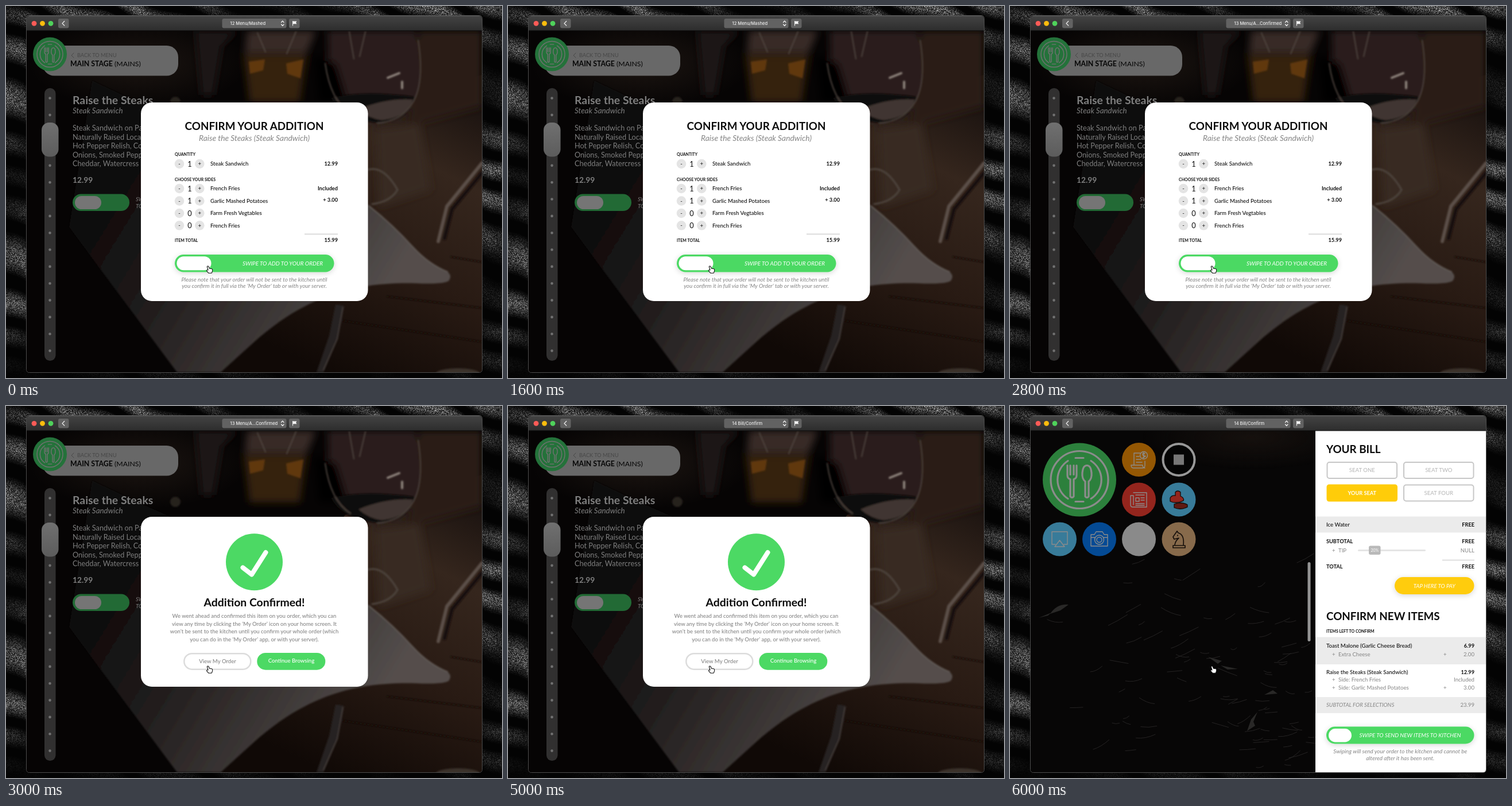
An HTML page with a canvas that plays this animation: 864x648 px, repeating every 6.2 s.

```html
<!DOCTYPE html>
<html lang="en">
<head>
<meta charset="utf-8">
<title>Restaurant ordering</title>
<style>
html, body { margin: 0; width: 100%; height: 100%; overflow: hidden; background: #000; }
canvas, svg { position: absolute; left: 0; top: 0; width: 864px; height: 648px; }
text { font: 9.6px Lato, "Open Sans", sans-serif; fill: #111; white-space: pre; }
.b { font-weight: 700; }
.m { font-weight: 500; }
.i { font-style: italic; }
.h { font-weight: 700; font-size: 18.8px; fill: #0c0c0c; }
.cap { font-weight: 700; font-size: 7px; }
.price { font-weight: 700; font-size: 9.2px; }
.grey { fill: #858585; }
.pale { fill: #b5b5b5; }
.w { fill: #fff; }
.mid { text-anchor: middle; }
.end { text-anchor: end; }
.dim text { fill: #7e7e7e; }
.desc { font-size: 12.7px; }
.num { font-size: 12.8px; text-anchor: middle; }
.bar text { font: 500 7.55px Inter, Roboto, sans-serif; fill: #eee; }
.line { fill: none; stroke-linecap: round; stroke-linejoin: round; }
.menuTitle, .doneTitle, .billTitle, .dining, .ask, .done, .bill { animation: 6.2s step-end infinite; }
.menuTitle { animation-name: menuTitle; }
.doneTitle { animation-name: doneTitle; }
.billTitle { animation-name: billTitle; }
.dining { animation-name: dining; }
.ask { animation-name: ask; }
.done { animation-name: done; }
.bill { animation-name: bill; }
@keyframes menuTitle { 0% { opacity: 1 } 45.161%, 100% { opacity: 0 } }
@keyframes doneTitle { 0% { opacity: 0 } 45.161% { opacity: 1 } 80.645%, 100% { opacity: 0 } }
@keyframes billTitle { 0% { opacity: 0 } 80.645%, 100% { opacity: 1 } }
@keyframes ask { 0% { opacity: 1 } 48.387%, 100% { opacity: 0 } }
@keyframes done { 0% { opacity: 0 } 48.387% { opacity: 1 } 83.871%, 100% { opacity: 0 } }
@keyframes dining { 0% { opacity: 1 } 83.871%, 100% { opacity: 0 } }
@keyframes bill { 0% { opacity: 0 } 83.871%, 100% { opacity: 1 } }
</style>
</head>
<body>
<canvas id="sand" width="864" height="648"></canvas>
<svg viewBox="0 0 864 648">
  <defs>
    <clipPath id="pane"><path d="M36 43H829V633Q829 638 824 638H41Q36 638 36 633Z"/></clipPath>
    <linearGradient id="barFill" x2="0" y2="1"><stop stop-color="#434343"/><stop offset="1" stop-color="#2d2d2d"/></linearGradient>
    <linearGradient id="plate" x1="180" y1="250" x2="640" y2="530" gradientUnits="userSpaceOnUse">
      <stop stop-color="#0a0808"/><stop offset=".35" stop-color="#1f1b1b"/><stop offset=".7" stop-color="#3a3534"/><stop offset="1" stop-color="#544e4c"/>
    </linearGradient>
    <linearGradient id="wood" x1="560" y1="640" x2="800" y2="160" gradientUnits="userSpaceOnUse">
      <stop stop-color="#100906"/><stop offset=".4" stop-color="#281a13"/><stop offset=".75" stop-color="#35261d"/><stop offset="1" stop-color="#1b1310"/>
    </linearGradient>
    <linearGradient id="thumb" x2="0" y2="1"><stop stop-color="#707070"/><stop offset="1" stop-color="#5c5c5c"/></linearGradient>
    <radialGradient id="glow"><stop stop-color="#1c1511"/><stop offset="1" stop-color="#1c1511" stop-opacity="0"/></radialGradient>
    <filter id="blur2" x="-30%" y="-30%" width="160%" height="160%"><feGaussianBlur stdDeviation="1.5"/></filter>
    <filter id="blur8" x="-30%" y="-30%" width="160%" height="160%"><feGaussianBlur stdDeviation="7"/></filter>
    <filter id="lift" x="-20%" y="-60%" width="140%" height="240%"><feDropShadow dx="0" dy="2" stdDeviation="5" flood-opacity=".16"/></filter>
    <g id="stepper">
      <circle cx="302" r="8.3" fill="#e4e4e4"/><circle cx="337.300" r="8.300" fill="#e4e4e4"/>
      <text class="mid" x="302" y="3">-</text><text class="mid" x="337.300" y="3.200">+</text>
    </g>
    <g id="cutlery" class="line" stroke-width="3.2">
      <circle r="50"/>
      <path d="M-20-33A39 39 0 0 0-20 33M20-33A39 39 0 0 1 20 33M-7-38H7M-7 38H7"/>
      <path d="M-21-25V-8Q-21-2-16-1V29Q-13 33-10 29V-1Q-5-2-5-8V-25M-16-25V-9M-10-25V-9"/>
      <path d="M10 3V29Q13 33 16 29V3Q22-2 21-12Q20-25 13-25Q6-25 5-12Q4-2 10 3Z"/>
    </g>
  </defs>

  <rect x="35.500" y="16.500" width="794" height="622" rx="5" fill="#080706" stroke="#4c4c4c"/>

  <g clip-path="url(#pane)">
    <g class="dining">
      <rect x="36" y="43" width="793" height="595" fill="#060404"/>
      <ellipse cx="230" cy="100" rx="190" ry="80" fill="url(#glow)"/>
      <path d="M590 190L829 120V638H360Z" fill="url(#wood)"/>
      <g filter="url(#blur8)">
        <path d="M720 43H829V175L700 210Z" fill="#2a1e18"/>
        <path d="M330 43H404L376 70L362 155H340Z" fill="#1d1714"/>
        <path d="M414 84H524L512 168H424Z" fill="#36210f"/>
        <path d="M420 43H540L524 82H416Z" fill="#372c26"/>
        <path d="M560 43H715L722 130Q715 190 650 205Q575 190 562 130Z" fill="#291f1a"/>
        <path d="M536 85L575 100L596 168H545Z" fill="#060404"/>
        <path d="M645 215L720 205L740 320L650 350Z" fill="#382a22"/>
      </g>
      <g filter="url(#blur2)">
        <path d="M566 160Q620 146 712 158Q703 198 655 204Q585 199 566 160Z" fill="#0d0807"/>
        <path d="M614 180Q662 160 709 163Q699 194 655 199Q632 196 614 180Z" fill="#3f3530"/>
        <g class="line" stroke="#4e443e" stroke-width="2">
          <path d="M718 60Q729 130 710 166Q690 201 647 204M626 45L616 88M598 45L606 92M438 47L452 80M505 45L489 83M556 100Q565 165 600 187"/>
          <path d="M665 125L685 117M690 132V143" stroke="#8d837c" stroke-width="4"/>
          <path d="M631 285Q658 278 682 320Q670 341 638 345" stroke-width="3"/>
        </g>
        <path d="M423 97L451 93L448 112L425 118ZM488 100L518 93L513 126L490 118Z" fill="#603811"/>
        <circle cx="295" cy="167" r="9" fill="#25201d"/>
        <path d="M150 130L235 170L632 347Q673 380 710 421Q737 450 769 463Q778 470 771 479Q760 485 715 483C625 481 530 495 427 590L374 638H298L110 385Z" fill="url(#plate)"/>
        <path class="line" d="M632 348Q673 380 710 421Q737 450 769 463" stroke="#625b57" stroke-width="2"/>
        <path d="M574 520L589 522L578 580L553 638H541L563 574Z" fill="#272120"/>
        <path class="line" d="M587 525L577 580L553 634" stroke="#4c4542" stroke-width="1.500"/>
        <path class="line" d="M753 410L768 349L829 274" stroke="#5b5048" stroke-width="6"/>
        <path class="line" d="M764 405L777 354L829 291" stroke="#18100d" stroke-width="6"/>
        <path class="line" d="M585 548L829 585M664 506L829 526M775 437L829 446" stroke="#120b08" stroke-width="2"/>
        <ellipse cx="787" cy="640" rx="38" ry="9" fill="#3a302b"/>
      </g>

      <g class="dim">
        <rect x="64" y="69" width="236" height="52.500" rx="20" fill="#686868"/>
        <circle cx="76.500" cy="84" r="29.500" fill="#24723a"/>
        <use href="#cutlery" transform="translate(76.500 84) scale(.45)" stroke="#717171"/>
        <path class="line" d="M118 82l-4 4 4 4" stroke="#474747"/>
        <text x="124" y="89.300" style="font-size:9.2px;fill:#474747">BACK TO MENU</text>
        <text x="112" y="105.300" style="font-size:12.3px;fill:#050505"><tspan class="b">MAIN STAGE</tspan> (MAINS)</text>
        <rect x="67" y="143" width="19.500" height="475" rx="9.700" fill="#313030"/>
        <path class="line" d="M76.500 160.500V601" stroke="#717171" stroke-width="4.600" stroke-dasharray="0 29.340"/>
        <rect x="62" y="203" width="29.500" height="59.500" rx="13" fill="url(#thumb)"/>
        <text class="b" x="116" y="170.500" style="font-size:19.4px">Raise the Steaks</text>
        <text class="i" x="116" y="186.500" style="font-size:13.4px">Steak Sandwich</text>
        <text class="desc" x="116" y="217.300">Steak Sandwich on Pan</text>
        <text class="desc" x="116" y="232.800">Naturally Raised Local</text>
        <text class="desc" x="116" y="248.300">Hot Pepper Relish, Corn</text>
        <text class="desc" x="116" y="263.700">Onions, Smoked Pepper</text>
        <text class="desc" x="116" y="279.200">Cheddar, Watercress</text>
        <text class="b" x="116" y="308" style="font-size:13.8px">12.99</text>
        <rect x="116" y="327.500" width="99" height="29.500" rx="14.700" fill="#226a35"/>
        <rect x="120" y="331" width="46" height="23" rx="11.500" fill="#757575"/>
        <text class="i" x="226" y="339.500">SWIPE</text><text class="i" x="226" y="351.500">TO ADD</text>
      </g>
    </g>

    <g class="ask">
      <rect x="235" y="168" width="395.500" height="346" rx="19" fill="#fff"/>
      <text class="h mid" x="432.500" y="215.500">CONFIRM YOUR ADDITION</text>
      <text class="i grey mid" x="432.500" y="235" style="font-size:13.8px">Raise the Steaks (Steak Sandwich)</text>
      <text class="cap" x="294" y="261.300">QUANTITY</text>
      <text class="cap" x="294" y="304.500">CHOOSE YOUR SIDES</text>
      <text class="cap" x="294" y="410.500">ITEM TOTAL</text>
      <use href="#stepper" y="275"/><use href="#stepper" y="318"/><use href="#stepper" y="339.500"/><use href="#stepper" y="361"/><use href="#stepper" y="382.300"/>
      <text class="num" x="320" y="279.500">1</text><text class="num" x="320" y="322.500">1</text><text class="num" x="320" y="344">1</text><text class="num" x="320" y="365.500">0</text><text class="num" x="320" y="386.800">0</text>
      <text class="m" x="356" y="278.300">Steak Sandwich</text><text class="m" x="356" y="321.300">French Fries</text>
      <text class="m" x="356" y="342.800">Garlic Mashed Potatoes</text><text class="m" x="356" y="364.300">Farm Fresh Vegtables</text>
      <text class="m" x="356" y="385.600">French Fries</text>
      <text class="price end" x="578" y="278.300">12.99</text><text class="price end" x="578" y="321.300">Included</text>
      <text class="price end" x="578" y="341.300">+ 3.00</text><text class="price end" x="578" y="411.300">15.99</text>
      <rect x="520" y="396.300" width="58" height="2.200" fill="#dedede"/>
      <rect x="294" y="433" width="277.500" height="30.500" rx="15.200" fill="#4cd964" filter="url(#lift)"/>
      <rect x="297.500" y="436.300" width="60" height="24" rx="12" fill="#fff"/>
      <text class="i w" x="412" y="451.800" style="font-size:9.9px">SWIPE TO ADD TO YOUR ORDER</text>
      <text class="i grey mid" x="432.500" y="479.800" style="font-size:9.9px">Please note that your order will not be sent to the kitchen until</text>
      <text class="i grey mid" x="432.500" y="491.300" style="font-size:9.9px">you confirm it in full via the 'My Order' tab or with your server.</text>
    </g>

    <g class="done">
      <rect x="235" y="193" width="395.500" height="296" rx="19" fill="#fff"/>
      <circle cx="432.500" cy="271.800" r="49.500" fill="#4cd964"/>
      <path class="line" d="M412.500 281.500L428 293.500L452.500 255" stroke="#fff" stroke-width="8"/>
      <text class="h mid" x="432.500" y="348.800" style="font-size:19.4px">Addition Confirmed!</text>
      <g style="font-size:9.5px">
        <text class="m grey mid" x="432.500" y="369.300" style="font-size:inherit">We went ahead and confirmed this item on you order, which you can</text>
        <text class="m grey mid" x="432.500" y="382.700" style="font-size:inherit">view any time by clicking the ‘My Order’ icon on your home screen. It</text>
        <text class="m grey mid" x="432.500" y="396.100" style="font-size:inherit">won’t be sent to the kitchen until you confirm your whole order (which</text>
        <text class="m grey mid" x="432.500" y="409.500" style="font-size:inherit">you can do in the ‘My Order’ app, or with your server).</text>
      </g>
      <rect x="310.300" y="431.200" width="116" height="27.500" rx="13.700" fill="#fff" stroke="#dcdcdc" stroke-width="2.500"/>
      <text class="m grey mid" x="368.500" y="448">View My Order</text>
      <rect x="437.300" y="430" width="119" height="29.700" rx="14.800" fill="#4cd964"/>
      <text class="m w mid" x="497" y="447.300">Continue Browsing</text>
    </g>

    <g class="bill">
      <rect x="36" y="43" width="496" height="595" fill="#070606"/>
      <ellipse cx="420" cy="55" rx="190" ry="55" fill="url(#glow)" opacity=".7"/>
      <path id="cracks" class="line" stroke="#2a2827" stroke-width=".9"/>
      <path d="M70 362Q82 344 102 346L88 356ZM50 369L72 360L66 365ZM413 566L420 546L431 533L424 550L427 557ZM345 437L369 444L362 449ZM367 452L397 458L379 459ZM443 503L458 495L466 501Z" fill="#292827"/>
      <circle cx="121" cy="128.500" r="64" fill="#2c803c"/>
      <use href="#cutlery" x="121" y="128.500" stroke="#8c8c8c"/>
      <circle cx="224.500" cy="93.500" r="29.500" fill="#945703"/>
      <circle cx="294" cy="93.500" r="27.500" fill="#050505" stroke="#989898" stroke-width="4"/>
      <rect x="285" y="84.500" width="18" height="18" fill="#777"/>
      <circle cx="224.500" cy="163" r="29.500" fill="#94251d"/>
      <circle cx="294" cy="163" r="29.500" fill="#387b99"/>
      <circle cx="86.500" cy="232" r="29.500" fill="#387b99"/>
      <circle cx="155.500" cy="232" r="29.500" fill="#044a94"/>
      <circle cx="224.500" cy="232" r="29.500" fill="#8a8a8a"/>
      <circle cx="294" cy="232" r="29.500" fill="#876a4b"/>
      <g class="line" stroke="#8c8c8c" stroke-width="1.400">
        <path d="M227 82H216V103H211Q211 108 215 108H231Q235 108 235 103V96M216 103H231Q231 108 235 108M220 88H225M220 93H228M220 98H230"/>
        <circle cx="233" cy="86" r="6.500"/><path d="M235 83Q231 81 231 84T235 87T231 90M233 81V91"/>
        <path d="M215 151H238V176H214Q210 176 210 172V156H215V172M219 155H234M219 160H225V166H219ZM228 160H234M228 164H234M219 170H234M219 173H234"/>
        <path d="M79 241H73V219H100V241H94M86.500 234L95 245H78Z"/>
        <path d="M141 224H147L150 219H161L164 224H170V244H141ZM141 229H148M163 229H170"/>
        <circle cx="155.500" cy="233" r="8"/><circle cx="155.500" cy="233" r="4.500"/>
      </g>
      <g stroke="#150b09" stroke-width="1.300">
        <path d="M279 160Q282 155 288 156V150Q292 146 297 150V157Q304 160 302 165Q289 171 279 166Z" fill="#94251d"/>
        <path d="M286 171Q299 166 309 172V176Q297 182 286 177Z" fill="#5e1a14"/>
      </g>
      <path class="line" d="M284 247H305V243H284ZM287 242Q288 235 294 230L286 232L284 228L291 218L293 221Q304 224 302 242M292 225V226" stroke="#17100b" stroke-width="1.700"/>
      <rect x="518.500" y="272" width="5" height="138" rx="2.500" fill="#949494"/>

      <rect x="532" y="43" width="297" height="595" fill="#fff"/>
      <g fill="#ebebeb"><rect x="532" y="192.500" width="297" height="28"/><rect x="532" y="402.500" width="297" height="47.500"/><rect x="532" y="507" width="297" height="28"/></g>
      <text class="h" x="551" y="81.500">YOUR BILL</text>
      <g fill="#fff" stroke="#c7c7c7" stroke-width="2">
        <rect x="552.500" y="98" width="121.500" height="28" rx="4"/><rect x="686" y="98" width="121.500" height="28" rx="4"/><rect x="686" y="137.500" width="121.500" height="28" rx="4"/>
      </g>
      <rect x="551.500" y="136.500" width="123.500" height="30" rx="4.500" fill="#ffcc09"/>
      <text class="pale mid" x="613.300" y="115.300">SEAT ONE</text><text class="pale mid" x="746.800" y="115.300">SEAT TWO</text>
      <text class="price w mid" x="613.300" y="154.700">YOUR SEAT</text><text class="pale mid" x="746.800" y="154.700">SEAT FOUR</text>
      <text class="m" x="551" y="209.500">Ice Water</text><text class="price end" x="809" y="209.500">FREE</text>
      <text class="price" x="551" y="239">SUBTOTAL</text><text class="price end" x="809" y="239">FREE</text>
      <text class="grey" x="561" y="254.700">+</text><text class="grey" x="572" y="254.700">TIP</text><text class="grey end" x="809" y="254.700">NULL</text>
      <rect x="606" y="250" width="118" height="3" rx="1.500" fill="#e5e5e5"/>
      <rect x="625" y="243.500" width="20.500" height="15.500" rx="3" fill="#b9b9b9"/><text class="w mid" x="635.300" y="254" style="font-size:7px">20%</text>
      <rect x="753" y="267.500" width="56" height="2" fill="#dedede"/>
      <text class="price" x="551" y="282.500">TOTAL</text><text class="price end" x="809" y="282.500">FREE</text>
      <rect x="670" y="298" width="138.500" height="30" rx="15" fill="#ffcc09" filter="url(#lift)"/>
      <text class="i w mid" x="739.300" y="316.500">TAP HERE TO PAY</text>
      <text class="h" x="551" y="372.500">CONFIRM NEW ITEMS</text>
      <text class="cap" x="551" y="394.500">ITEMS LEFT TO CONFIRM</text>
      <text class="m" x="551" y="421.300">Toast Malone (Garlic Cheese Bread)</text><text class="price end" x="809" y="421.300">6.99</text>
      <text class="grey" x="561" y="436.300">+</text><text class="grey" x="572" y="436.300">Extra Cheese</text><text class="grey" x="755" y="436.300">+</text><text class="grey end" x="809" y="436.300">2.00</text>
      <text class="m" x="551" y="466.800">Raise the Steaks (Steak Sandwich)</text><text class="price end" x="809" y="466.800">12.99</text>
      <text class="grey" x="561" y="480.300">+</text><text class="grey" x="572" y="480.300">Side: French Fries</text><text class="grey end" x="809" y="480.300">Included</text>
      <text class="grey" x="561" y="493.800">+</text><text class="grey" x="572" y="493.800">Side: Garlic Mashed Potatoes</text><text class="grey" x="755" y="493.800">+</text><text class="grey end" x="809" y="493.800">3.00</text>
      <text class="i grey" x="551" y="524.300">SUBTOTAL FOR SELECTIONS</text><text class="grey end" x="809" y="524.300">23.99</text>
      <rect x="551" y="558.500" width="257.500" height="30" rx="15" fill="#4cd964" filter="url(#lift)"/>
      <rect x="555" y="562" width="40" height="23.500" rx="11.700" fill="#fff"/>
      <text class="i w" x="608.500" y="577" style="font-size:9.8px">SWIPE TO SEND NEW ITEMS TO KITCHEN</text>
      <text class="i grey mid" x="679.800" y="605" style="font-size:9.9px">Swiping will send your order to the kitchen and cannot be</text>
      <text class="i grey mid" x="679.800" y="616.500" style="font-size:9.9px">altered after it has been sent.</text>
    </g>
    <path d="M350.300 454Q351.500 452.200 353 453.800L354.500 457.300L358.500 457.800Q360 458.300 359.700 460.500L359 463.500L358 465.300H353L349.500 461.300Q349.500 459.300 352 460Z" fill="#fff" stroke="#111" stroke-width="1.100" stroke-linejoin="round"/>
  </g>

  <g class="bar">
    <path d="M36 43V22Q36 17 41 17H824Q829 17 829 22V43Z" fill="url(#barFill)"/>
    <path d="M40 17.300H825" stroke="#656565" stroke-width=".8"/><path d="M36 43H829" stroke="#0b0b0b"/>
    <circle cx="49" cy="30.300" r="4.400" fill="#fc5b57"/><circle cx="63.500" cy="30.300" r="4.400" fill="#fdbd0d"/><circle cx="78" cy="30.300" r="4.400" fill="#4fd25b"/>
    <g fill="#626262"><rect x="91" y="22" width="18.500" height="16.500" rx="3"/><rect x="376.500" y="22" width="112" height="16.500" rx="3"/><rect x="493" y="22" width="18.500" height="16.500" rx="3"/></g>
    <path class="line" d="M101.700 26.500L98 30.300L101.700 34M479.500 28.500L481.800 26L484 28.500M479.500 32L481.800 34.500L484 32" stroke="#f2f2f2" stroke-width="1.200"/>
    <path d="M499 26H500V34.500H499ZM500 26.500H506.500L505 29L506.500 31.300H500Z" fill="#f4f4f4"/>
    <text class="menuTitle" x="390.500" y="33.200">12 Menu/Mashed</text>
    <text class="doneTitle" x="390.500" y="33.200">13 Menu/A...Confirmed</text>
    <text class="billTitle" x="390.500" y="33.200">14 Bill/Confirm</text>
  </g>
</svg>
<script>
let seed = 7;
const random = () => (seed = (seed * 16807) % 2147483647) / 2147483647;

// Wind-rippled sand: grain brightness follows slanted waves.
const pen = document.getElementById('sand').getContext('2d');
const picture = pen.createImageData(864, 648);
for (let y = 0, at = 0; y < 648; y++) {
  for (let x = 0; x < 864; x++, at += 4) {
    const ripple = Math.sin((y - x * .55 + 9 * Math.sin(x / 23)) / 11 + 1.5 * Math.sin(y / 47));
    const drift = .6 + .4 * Math.sin(y / 58 + x / 90 - .6);
    const light = Math.max(0, ripple * .55 + .4) * drift * Math.min(1, (668 - y) / 130);
    const grain = random();
    picture.data.fill(3 + light * (26 + 170 * grain * grain), at, at + 3);
    picture.data[at + 3] = 255;
  }
}
pen.putImageData(picture, 0, 0);

// Hairline creases in the dark leather.
let creases = '';
for (let n = 0; n < 85; n++) {
  const x = 40 + 480 * Math.sqrt(random()), y = 270 + 365 * random();
  const dx = 8 + 26 * random(), dy = dx * (random() * 1.1 - .65);
  creases += `M${x} ${y}q${dx / 2} ${dy / 2 + 5 * random()} ${dx} ${dy}`;
}
document.getElementById('cracks').setAttribute('d', creases);
</script>
</body>
</html>
```
